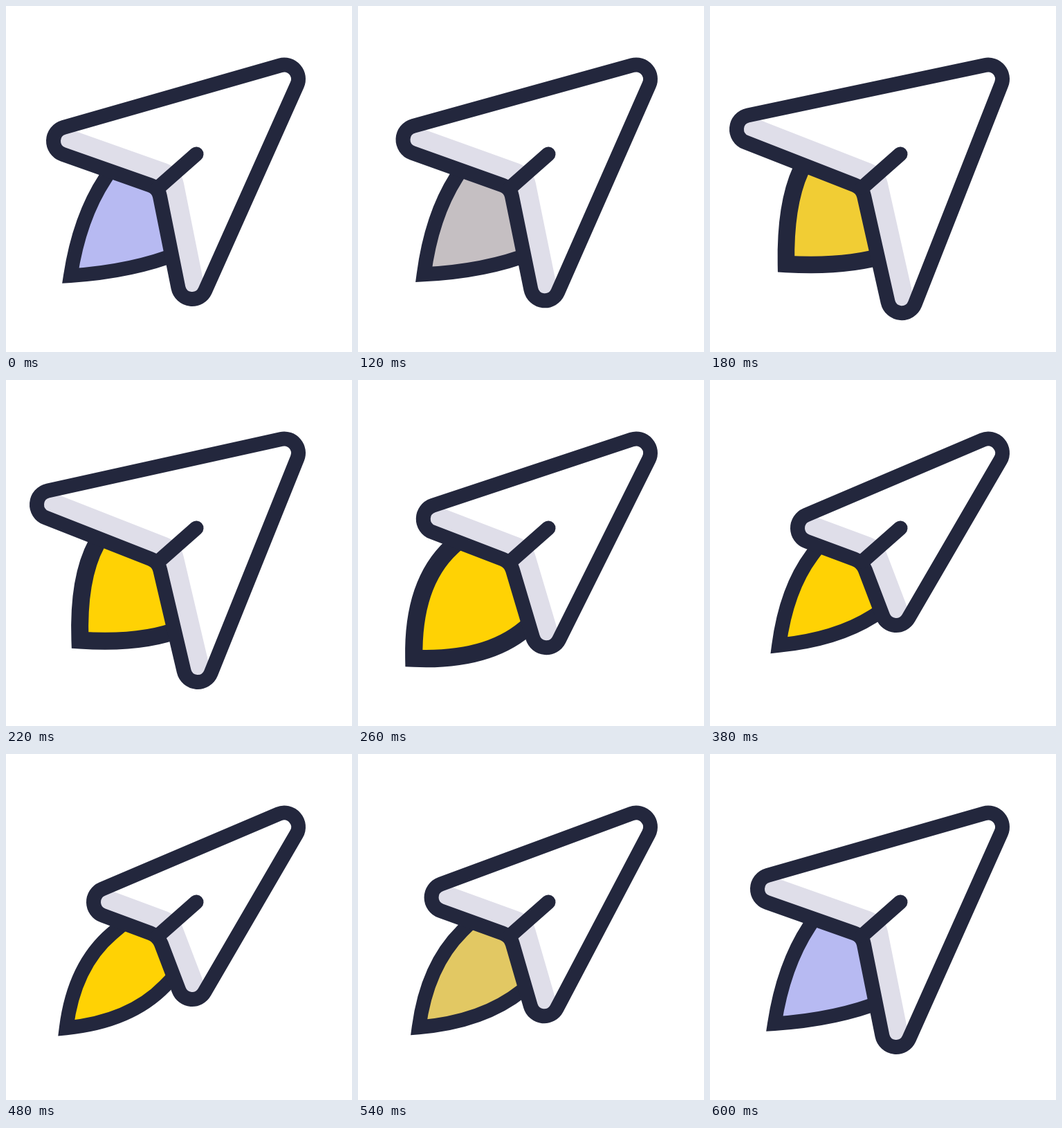
These frames come from a looping animation (500x500 px, 0.72 s). An HTML page:

```html
<!DOCTYPE html>
<html lang="en">
<head>
<meta charset="utf-8">
<title>Paper plane</title>
<style>
  html, body { margin: 0; width: 100%; height: 100%; overflow: hidden; background: #fff; }
  svg { display: block; width: 100vw; height: 100vh; }
</style>
</head>
<body>
<svg viewBox="0 0 500 500" stroke="#23273d" stroke-width="21">
  <clipPath id="hull"><path id="hullPath" stroke="none"/></clipPath>
  <path id="flame" transform="translate(220.5 262.5) rotate(135)"/>
  <path id="body" fill="#fff" stroke="none"/>
  <g clip-path="url(#hull)">
    <path id="shade" fill="none" stroke="#dfdee9" stroke-width="75" stroke-linejoin="round"/>
  </g>
  <path id="outline" fill="none"/>
  <path d="M220 262.5L275 214" stroke-linecap="round"/>
</svg>
<script>
const LOOP = 720, STEP = 20, BEAT = 100, BEATS = 5, R = 20.5;
const NOSE = [402, 105.5], NOTCH = [220, 263];
const $ = id => document.getElementById(id);

// Centres of the left and the bottom wing tip
const rest = [89, 195, 269, 403];
const wide = [55.5, 176, 278, 425.5];
const slim = [147, 214, 269, 334];
const wings = [rest, wide, slim, slim, slim, rest];

// Flame: length, bulge, half width, lean, line width
const calm = [180, 55, 76, -12, 20.5];
const flames = [
  calm,
  [153.5, 65, 88, -5, 25],
  [221.5, 88, 75, -4, 25.5],
  [165, 47, 61, -4, 20.5],
  [191.5, 58.5, 53, -4, 20.5],
  calm
];

const lilac = [183, 186, 242], yellow = [255, 210, 4];

const clamp = (v, lo, hi) => Math.min(hi, Math.max(lo, v));
const smooth = u => u * u * (3 - 2 * u);
const mix = (a, b, k) => a.map((v, i) => v + (b[i] - v) * k);
const fmt = p => p.map(v => v.toFixed(2)).join(" ");
const polar = (c, angle, r) => [c[0] + r * Math.cos(angle), c[1] + r * Math.sin(angle)];

// Eased pose, one beat per pose
function pose(poses, beat) {
  const i = Math.min(Math.floor(beat), BEATS - 1);
  return mix(poses[i], poses[i + 1], smooth(beat - i));
}

// Point at the given distance past q, coming from p
function beyond(p, q, dist) {
  const dx = q[0] - p[0], dy = q[1] - p[1], len = Math.hypot(dx, dy);
  return [q[0] + dx / len * dist, q[1] + dy / len * dist];
}

// Where a line from the notch touches a wing tip circle
function touch(c, side) {
  const dx = NOTCH[0] - c[0], dy = NOTCH[1] - c[1];
  return polar(c, Math.atan2(dy, dx) + side * Math.acos(R / Math.hypot(dx, dy)), R);
}

function drawPlane(beat) {
  const w = pose(wings, beat);
  const left = w.slice(0, 2), low = w.slice(2);
  const normal = (p, q) => Math.atan2(q[1] - p[1], q[0] - p[0]) - Math.PI / 2;
  const top = normal(left, NOSE), right = normal(NOSE, low);
  const leftEdge = touch(left, 1), lowEdge = touch(low, -1);
  const arc = p => `A${R} ${R} 0 0 1 ${fmt(p)}`;
  const start = polar(left, top, R);

  const d = `M${fmt(start)}L${fmt(polar(NOSE, top, R))}` + arc(polar(NOSE, right, R)) +
    `L${fmt(polar(low, right, R))}` + arc(lowEdge) +
    `L${fmt(beyond(lowEdge, NOTCH, -12))}Q${fmt(NOTCH)} ${fmt(beyond(leftEdge, NOTCH, -12))}` +
    `L${fmt(leftEdge)}` + arc(start) + "Z";
  for (const id of ["hullPath", "body", "outline"]) $(id).setAttribute("d", d);

  $("shade").setAttribute("d",
    `M${fmt(beyond(NOTCH, leftEdge, 40))}L${fmt(NOTCH)}L${fmt(beyond(NOTCH, lowEdge, 40))}`);
}

// The flame lies along its own x axis, from the notch to the tip
function drawFlame(beat) {
  const [length, bulge, half, lean, line] = pose(flames, beat);
  const side = s => {
    const base = [45, s * half + lean];
    const ctrl = [length * 0.62, s * bulge + lean * 0.4];
    return { base, ctrl, hidden: beyond(ctrl, base, 34) };
  };
  const a = side(1), b = side(-1);
  const flame = $("flame");
  flame.setAttribute("d",
    `M-20 0L${fmt(a.hidden)}L${fmt(a.base)}Q${fmt(a.ctrl)} ${fmt([length, 0])}` +
    `Q${fmt(b.ctrl)} ${fmt(b.base)}L${fmt(b.hidden)}Z`);
  flame.setAttribute("stroke-width", line.toFixed(2));
  const heat = clamp(Math.min(beat, BEATS - beat), 0, 1);
  flame.setAttribute("fill", `rgb(${mix(lilac, yellow, heat).map(Math.round)})`);
}

function draw(time) {
  const t = Math.floor((time % LOOP) / STEP) * STEP;
  const beat = clamp(t / BEAT - 1, 0, BEATS);
  drawPlane(beat);
  drawFlame(beat);
}

const begin = performance.now();
function tick() {
  draw(performance.now() - begin);
  requestAnimationFrame(tick);
}
tick();
</script>
</body>
</html>
```
